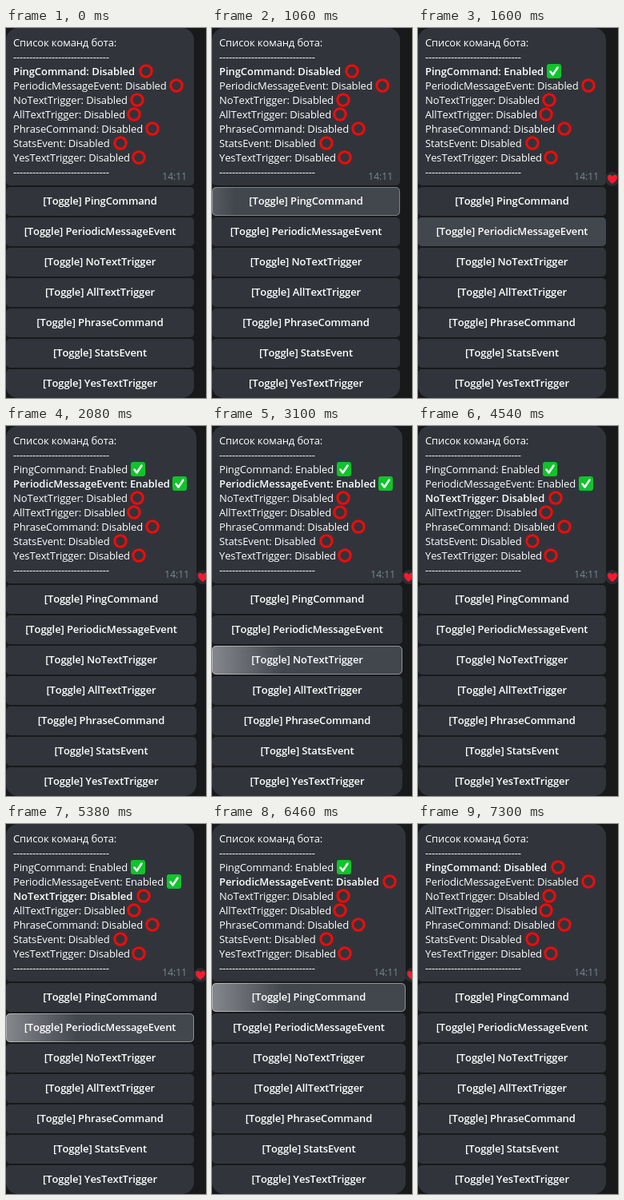
These frames come from a looping animation (250x463 px, 7.54 s). An HTML page:

```html
<!DOCTYPE html>
<html lang="ru">
<head>
<meta charset="utf-8">
<title>Bot command toggles</title>
<style>
html, body { margin: 0; width: 100%; height: 100%; overflow: hidden; background: #18191b; }
svg { display: block; }
text {
  font: 13px "Open Sans", "Noto Sans", sans-serif;
  font-kerning: none;
  letter-spacing: -.12px;
  fill: #fff;
  white-space: pre;
}
.bold, .label { font-weight: 600; }
.bold { letter-spacing: -.06px; }
.label { text-anchor: middle; }
.rule { letter-spacing: -.19px; }
.time { font-size: 12px; letter-spacing: 0; fill: #7c8894; text-anchor: end; }
.panel { fill: #31353b; }
.lit { fill: #42464d; }
.edge { fill: none; stroke: #fff; }
.ring { fill: none; stroke: #f20a0a; stroke-width: 3.1; }
.box { fill: #0fc42b; }
.tick { fill: none; stroke: #fff; stroke-width: 2.6; stroke-linecap: round; stroke-linejoin: round; }
.badge { fill: #2a2e33; }
.heart { fill: #f8192d; }
</style>
</head>
<body>
<svg id="stage" width="250" height="463" viewBox="0 0 250 463"></svg>
<script>
const LOOP = 7540, STEP = 60, OFFSET = 40;
const stage = document.getElementById('stage');

// x: centre of the status icon, extra: its shift when the row is bold
const commands = [
  { name: 'PingCommand', x: 168, extra: 7 },
  { name: 'PeriodicMessageEvent', x: 213, extra: 9 },
  { name: 'NoTextTrigger', x: 164, extra: 8 },
  { name: 'AllTextTrigger', x: 160 },
  { name: 'PhraseCommand', x: 183 },
  { name: 'StatsEvent', x: 143 },
  { name: 'YesTextTrigger', x: 166 }
];

const states = [
  { at: 0, on: [], bold: 0, width: 235 },
  { at: 1240, on: [0], bold: 0, width: 235 },
  { at: 2080, on: [0, 1], bold: 1, width: 238 },
  { at: 3160, on: [0, 1, 2], bold: 2, width: 235 },
  { at: 4540, on: [0, 1], bold: 2, width: 235 },
  { at: 5440, on: [0], bold: 1, width: 242 },
  { at: 6520, on: [], bold: 0, width: 235 }
];

// Ripple from lit, glare from load, answer at end
const presses = [
  { button: 0, lit: 940, load: 940, end: 1240, cx: 182, r: 200 },
  { button: 1, lit: 1600, load: 1900, end: 2080, cx: 140, r: 200 },
  { button: 2, lit: 2680, load: 2920, end: 3160, cx: 140, r: 200 },
  { button: 2, lit: 3760, load: 4240, end: 4540, cx: 140, r: 200 },
  { button: 1, lit: 4780, load: 5140, end: 5440, cx: 140, r: 54 },
  { button: 0, lit: 5860, load: 6280, end: 6520, cx: 182, r: 136 }
];

// Rectangle with separate top and bottom corner radii
function panel(y, w, h, top, bottom, x = 0) {
  const corner = (r, dx, dy) => `a${r} ${r} 0 0 1 ${dx * r} ${dy * r}`;
  return `M${x} ${y + top}${corner(top, 1, -1)}H${x + w - top}${corner(top, 1, 1)}` +
    `V${y + h - bottom}${corner(bottom, -1, 1)}H${x + bottom}${corner(bottom, -1, -1)}Z`;
}

function text(x, y, content, kind = '') {
  return `<text x="${x}" y="${y}" class="${kind}">${content}</text>`;
}

function icon(on, x, y) {
  return on
    ? `<rect class="box" x="${x - 9}" y="${y - 9}" width="18" height="18" rx="3"/>
       <path class="tick" d="M${x - 4.5} ${y + .5}l3 4 6 -9"/>`
    : `<circle class="ring" cx="${x}" cy="${y}" r="7.2"/>`;
}

function row(command, i, state) {
  const on = state.on.includes(i), bold = state.bold === i;
  const x = command.x + (bold ? command.extra : 0) - (on ? (bold ? 5 : 3) : 0);
  const label = `${command.name}: ${on ? 'Enabled' : 'Disabled'}`;
  return text(9, 59 + 18 * i, label, bold ? 'bold' : '') + icon(on, x, 54 + 18 * i);
}

function ripple(press, y, shape) {
  return `<clipPath id="clip"><path d="${shape}"/></clipPath>
    <circle class="lit" clip-path="url(#clip)" cx="${press.cx}" cy="${y + 18}" r="${press.r}"/>`;
}

function glare(press, t, shape, inset) {
  const peak = 4 + (t - press.end + STEP) * .5;
  const edge = Math.min(1, (t - press.load + STEP) / 240) * .42;
  return `<linearGradient id="glare" gradientUnits="userSpaceOnUse" x1="${peak - 85}" x2="${peak + 85}">
      <stop offset="0" stop-color="#fff" stop-opacity="0"/>
      <stop offset=".5" stop-color="#fff" stop-opacity=".34"/>
      <stop offset="1" stop-color="#fff" stop-opacity="0"/>
    </linearGradient>
    <path class="lit" d="${shape}"/>
    <path d="${shape}" fill="url(#glare)"/>
    <path class="edge" d="${inset}" stroke-opacity="${edge}"/>`;
}

function button(command, i, width, press, t) {
  const y = 199 + 38 * i, bottom = i === 6 ? 15 : 5;
  const shape = panel(y, width, 36, 5, bottom);
  let light = '';
  if (press && press.button === i) {
    light = t < press.load
      ? ripple(press, y, shape)
      : glare(press, t, shape, panel(y + .5, width - 1, 35, 5, bottom, .5));
  }
  return `<path class="panel" d="${shape}"/>` + light +
    text(width / 2, y + 22, `[Toggle] ${command.name}`, 'label');
}

function heart(t, width) {
  if (t < 1240 || t >= 7300) return '';
  const size = t < 7000 ? 1 : .6;
  return `<g transform="translate(${width + 8} 189) scale(${size})">
    <circle class="badge" r="9"/>
    <path class="heart" d="M0 6C-3 4-6 1-6-2C-6-6-1.500-6.500 0-3C1.500-6.500 6-6 6-2C6 1 3 4 0 6Z"/></g>`;
}

function draw(t) {
  const state = states.findLast(s => t >= s.at);
  const press = presses.find(p => t >= p.lit && t < p.end);
  const w = state.width, rule = '-'.repeat(30);
  stage.innerHTML =
    `<path class="panel" d="${panel(0, w, 197, 15, 5)}"/>` +
    text(9, 23, 'Список команд бота:') +
    text(9, 41, rule, 'rule') +
    commands.map((c, i) => row(c, i, state)).join('') +
    text(9, 185, rule, 'rule') +
    text(w - 9, 190, '14:11', 'time') +
    commands.map((c, i) => button(c, i, w, press, t)).join('') +
    heart(t, w);
}

let shown = -1;
const start = performance.now();
function tick() {
  const t = (performance.now() - start) % LOOP;
  const held = Math.max(0, Math.floor((t - OFFSET) / STEP) * STEP + OFFSET);
  if (held !== shown) draw(shown = held);
  requestAnimationFrame(tick);
}
tick();
</script>
</body>
</html>
```
